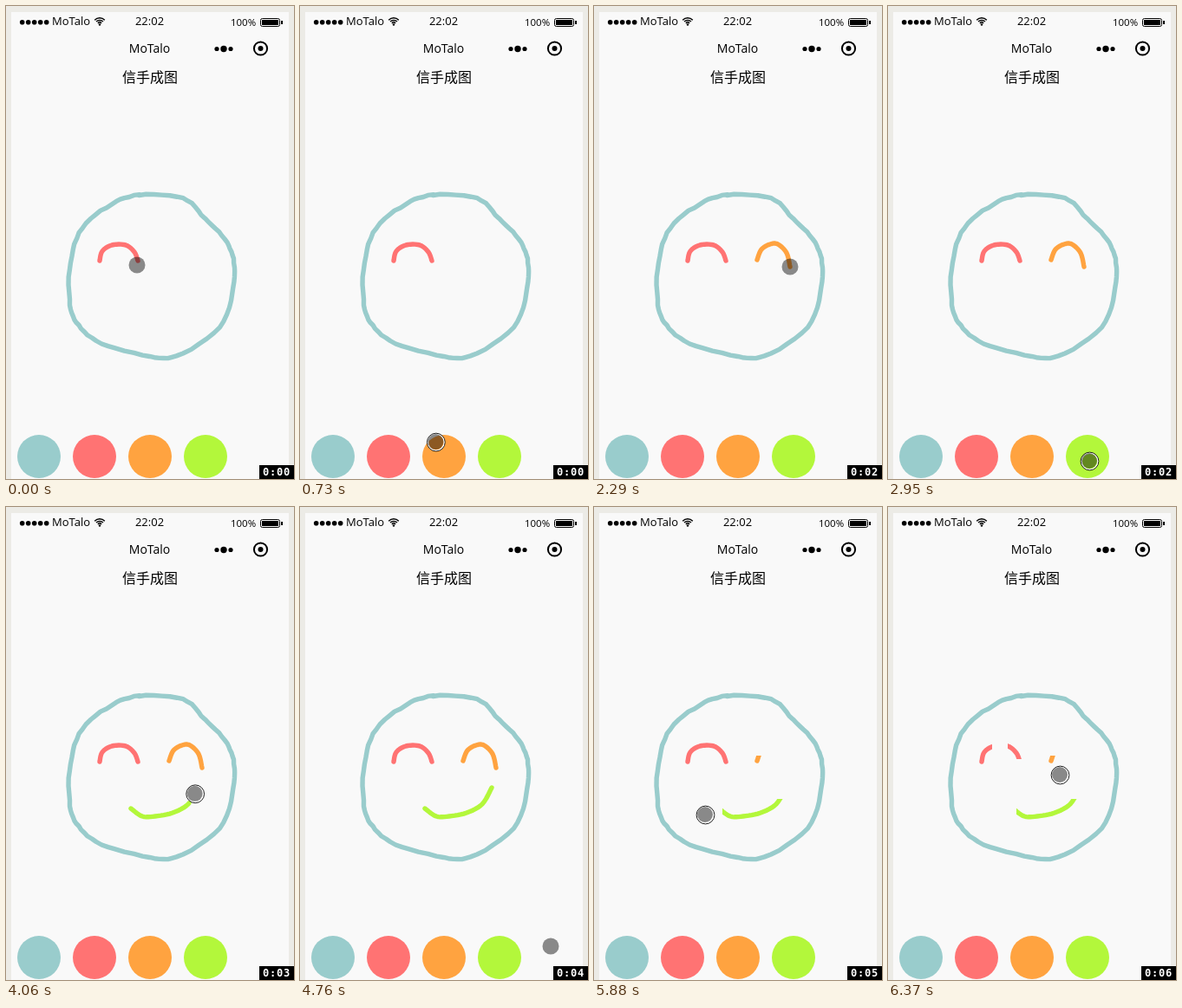
An HTML page with a canvas that plays this animation: 332x546 px, repeating every 6.47 s.

```html
<!DOCTYPE html>
<html lang="zh">
<head>
<meta charset="utf-8">
<title>Drawing pad</title>
<style>
html, body { margin: 0; width: 100%; height: 100%; overflow: hidden; background: #ecebe6; }
canvas { display: block; }
</style>
</head>
<body>
<canvas id="stage" width="332" height="546"></canvas>
<script>
const ctx = document.getElementById('stage').getContext('2d');
const LOOP = 6470;
const STEP = 140;
const PAPER = '#f9f9f9';
const COLORS = ['#99cccc', '#ff7373', '#ffa340', '#b3f73b'];
const LATIN = '"Open Sans", "Noto Sans", sans-serif';
const INK_LAG = 13;
const ERASER = 18;
const ERASE_FROM = 5300;
const TAPS = [640, 2940, 4900];

// Catmull-Rom curve through a few key points, as a fine polyline.
function spline(keys, closed = false, detail = 6) {
  const n = keys.length;
  const key = i => closed ? keys[(i + n) % n] : keys[Math.min(Math.max(i, 0), n - 1)];
  const points = [];
  for (let i = 0; i < (closed ? n : n - 1); i++) {
    const [a, b, c, d] = [key(i - 1), key(i), key(i + 1), key(i + 2)];
    for (let k = 0; k < detail; k++) {
      const u = k / detail;
      points.push([0, 1].map(j => b[j] + u / 2 * (c[j] - a[j]
        + u * (2 * a[j] - 5 * b[j] + 4 * c[j] - d[j] + u * (3 * (b[j] - c[j]) + d[j] - a[j])))));
    }
  }
  points.push(key(closed ? 0 : n - 1));
  return points;
}

function shaky(points, amount, seed = 7) {
  const random = () => (seed = seed * 16807 % 2147483647) / 2147483647 - 0.5;
  return points.map(([x, y]) => [x + random() * amount, y + random() * amount]);
}

const face = shaky(spline([
  [154, 218], [204, 222], [229, 245], [252, 269], [262, 292], [262, 325], [246, 371], [197, 404],
  [165, 404], [110, 390], [84, 368], [74, 345], [74, 296], [88, 256], [121, 229]
], true), 1.2);
const leftEye = spline([[108, 294], [111, 283], [122, 276], [138, 276], [148, 284], [152, 294]]);
const rightEye = spline([[188, 293], [193, 281], [203, 275], [212, 275], [222, 285], [226, 301]]);
const mouth = spline([[144, 348], [157, 357], [172, 357], [192, 353], [210, 343], [221, 324]]);

const liveStrokes = [
  { points: rightEye, color: COLORS[2], from: 1300, to: 2100 },
  { points: mouth, color: COLORS[3], from: 3600, to: 4100 }
];

// Finger stops: time, x, y. Once the eraser is picked, each stop also rubs out a square.
const stops = [
  [150, 151, 299], [640, 155, 512], [1130, 188, 296], [1300, 188, 293],
  [2100, 226, 301], [2290, 226, 301], [2900, 232, 525], [2980, 232, 525],
  [3440, 144, 348], [4100, 221, 324], [4200, 221, 324], [4760, 289, 507], [4950, 289, 510],
  [5320, 217, 328], [5480, 139, 346], [5740, 106, 355],
  [5775, 192, 278], [5800, 203, 278], [5825, 217, 278], [5850, 226, 296],
  [5880, 128, 355], [6160, 129, 276], [6230, 150, 300], [6300, 198, 309]
];

const ease = u => u * u * (3 - 2 * u);

function track(keys, t, easing = u => u) {
  const next = keys.findIndex(key => key[0] > t);
  if (next === 0) return keys[0].slice(1);
  if (next < 0) return keys[keys.length - 1].slice(1);
  const a = keys[next - 1], b = keys[next];
  const k = easing((t - a[0]) / (b[0] - a[0]));
  return a.slice(1).map((v, i) => v + (b[i + 1] - v) * k);
}

for (const live of liveStrokes) {
  live.length = 0;
  live.path = live.points.map((p, i) => {
    const last = live.points[Math.max(i - 1, 0)];
    live.length += Math.hypot(p[0] - last[0], p[1] - last[1]);
    return [live.length, ...p];
  });
}

const travelled = (live, t) => live.length * (t - live.from) / (live.to - live.from);

function disc(x, y, r, color) {
  ctx.fillStyle = color;
  ctx.beginPath();
  ctx.arc(x, y, r, 0, Math.PI * 2);
  ctx.fill();
}

function ring(x, y, r, color, width, from = 0, to = Math.PI * 2) {
  ctx.strokeStyle = color;
  ctx.lineWidth = width;
  ctx.beginPath();
  ctx.arc(x, y, r, from, to);
  ctx.stroke();
}

function label(text, x, y, font, color = '#000', align = 'center') {
  ctx.font = font;
  ctx.fillStyle = color;
  ctx.textAlign = align;
  ctx.fillText(text, x, y);
}

function stroke(points, color, length = 9999) {
  if (length <= 0) return;
  ctx.save();
  ctx.strokeStyle = color;
  ctx.lineWidth = 5.4;
  ctx.lineCap = ctx.lineJoin = 'round';
  ctx.setLineDash([length, 9999]);
  ctx.beginPath();
  points.forEach(p => ctx.lineTo(...p));
  ctx.stroke();
  ctx.restore();
}

function drawHeader() {
  for (let i = 0; i < 5; i++) disc(18.7 + i * 7, 18.7, 2.8, '#000');
  label('MoTalo', 53, 22, `13px ${LATIN}`, '#000', 'left');
  for (const r of [3, 5.6, 8.2]) ring(108, 22, r, '#000', 1.5, -Math.PI * 0.75, -Math.PI * 0.25);
  disc(108, 21.5, 1.2, '#000');
  label('22:02', 165.5, 22, `13px ${LATIN}`);
  label('100%', 273.5, 23, `11.5px ${LATIN}`);

  ctx.strokeStyle = '#000';
  ctx.lineWidth = 1;
  ctx.beginPath();
  ctx.roundRect(293.5, 14.5, 22, 9, 2);
  ctx.stroke();
  ctx.fillRect(295, 16, 19, 6);
  ctx.fillRect(317, 17, 2, 4);

  label('MoTalo', 165.5, 54, `14px ${LATIN}`);
  for (const side of [-1, 0, 1]) disc(251 + side * 8, 49.5, side ? 2.6 : 3.7, '#000');
  ring(293.5, 49, 7.6, '#000', 2);
  disc(293.5, 49, 3, '#000');
  label('信手成图', 166, 88, '16px "Noto Sans CJK SC", "Noto Sans CJK", sans-serif');
}

function drawPicture(t) {
  stroke(face, COLORS[0]);
  stroke(leftEye, COLORS[1]);
  for (const live of liveStrokes) {
    stroke(live.points, live.color, t < live.to ? travelled(live, t) - INK_LAG : undefined);
  }
  ctx.fillStyle = PAPER;
  for (const [at, x, y] of stops) {
    if (at >= ERASE_FROM && at <= t) ctx.fillRect(x - ERASER / 2, y - ERASER / 2, ERASER, ERASER);
  }
}

function drawFinger(t) {
  const live = liveStrokes.find(({ from, to }) => t >= from && t <= to);
  const [x, y] = live ? track(live.path, travelled(live, t)) : track(stops, t, ease);
  const pressed = live || t >= ERASE_FROM || TAPS.some(tap => Math.abs(t - tap) < 100);
  if (pressed) {
    ring(x + 0.6, y + 0.6, 9.4, '#fff', 1.6);
    ring(x + 0.5, y + 0.5, 10.4, '#222', 1);
  }
  disc(x, y, pressed ? 9 : 9.5, 'rgba(0, 0, 0, 0.45)');
}

function drawClock(t) {
  ctx.fillStyle = '#000';
  ctx.fillRect(292, 530, 40, 16);
  const seconds = Math.max(0, Math.floor((t - 100) / 1000));
  ctx.letterSpacing = '0.8px';
  label(`0:0${seconds}`, 296, 542, 'bold 12px "DejaVu Sans Mono", monospace', '#fff', 'left');
  ctx.letterSpacing = '0px';
}

function render(now) {
  const t = Math.floor(now % LOOP / STEP + 0.001) * STEP;
  ctx.fillStyle = '#ecebe6';
  ctx.fillRect(0, 0, 332, 546);
  ctx.fillStyle = PAPER;
  ctx.fillRect(6, 7, 320, 539);
  drawHeader();
  drawPicture(t);
  COLORS.forEach((color, i) => disc(38 + i * 64, 520, 25, color));
  drawFinger(t);
  drawClock(t);
}

const start = performance.now();
function tick() {
  render(performance.now() - start);
  requestAnimationFrame(tick);
}
tick();
</script>
</body>
</html>
```
